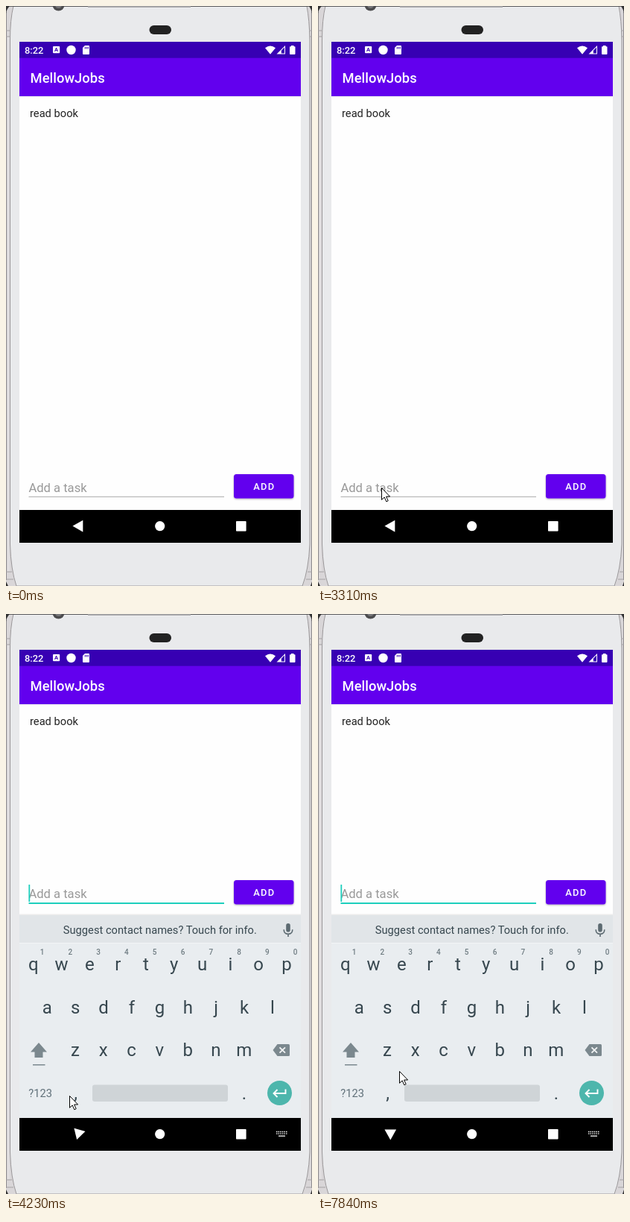
An HTML page that plays this animation: 411x778 px, repeating every 8 s.

```html
<!DOCTYPE html>
<html lang="en">
<head>
<meta charset="utf-8">
<title>To-do list</title>
<style>
  html, body { margin: 0; width: 100%; height: 100%; overflow: hidden; background: #e9eaec; }
  svg { display: block; width: 100vw; height: 100vh; font-family: Roboto, sans-serif; }
  .mid { text-anchor: middle; }
  .medium { font-weight: 500; }
</style>
</head>
<body>
<svg viewBox="0 0 411 778">
  <defs>
    <clipPath id="screen"><rect x="18" y="48" width="378" height="672"/></clipPath>
    <filter id="shadow" x="-10%" y="-20%" width="120%" height="150%">
      <feDropShadow dx="0" dy="1" stdDeviation=".9" flood-opacity=".32"/>
    </filter>
    <filter id="glow"><feDropShadow dx="0" dy="0" stdDeviation=".6" flood-opacity=".2"/></filter>
  </defs>

  <!-- phone body -->
  <rect width="411" height="778" fill="#d9d6d8"/>
  <path d="M10 0Q5.5 18 5.5 46V722Q6.5 756 14 778H398Q406.5 756 408 722V46Q407.5 18 404 0Z"
        fill="#e9eaec" stroke="#9a9799"/>
  <path d="M.5 8V770M410.5 8V770" stroke="#8e8b8d"/>
  <path d="M3.5 42V758" stroke="#e4e1e3" stroke-width="2"/>
  <path d="M0 33H6M0 41H6M408 33H411M408 41H411M0 759H8M0 769H10M405 759H411M403 769H411" stroke="#a5a2a4"/>
  <path d="M0 0H411" stroke="#3b3b3b" stroke-width="1.6"/>
  <path d="M110 1H248" stroke="#a4a4a6" stroke-width="2"/>
  <path d="M0 0H5Q1 4 0 10ZM411 0H407Q410 4 411 10ZM0 772L3 778H0ZM411 772L409 778H411Z" fill="#333"/>
  <circle cx="70.5" cy="-1.5" r="8" fill="#4c4c4e"/>
  <circle cx="70.5" cy="-1.5" r="4.5" fill="#77777a"/>
  <rect x="192.5" y="26" width="29.5" height="12" rx="6" fill="#222"/>

  <g clip-path="url(#screen)">
    <rect x="18" y="48" width="378" height="672" fill="#fefefe"/>
    <rect x="18" y="69" width="378" height="52" fill="#6200ee"/>
    <rect x="18" y="48" width="378" height="21.7" fill="#3700b3"/>
    <rect x="18" y="121" width="378" height="1" fill="#000" opacity=".06"/>

    <!-- status bar -->
    <g fill="#fff">
      <text class="medium" x="25" y="63.6" font-size="12.9">8:22</text>
      <rect x="63" y="54" width="9.2" height="9.2" rx="1"/>
      <text class="mid" x="67.6" y="61.4" font-size="7.5" font-weight="700" fill="#3700b3">A</text>
      <circle cx="87.5" cy="59" r="6.2"/>
      <path d="M106 53H111Q112 53 112 54V64Q112 65 111 65H104Q103 65 103 64V56Z"/>
      <path d="M106.3 55V57.5M108.3 55V57.5M110.3 55V57.5" stroke="#3700b3"/>
      <path d="M348 56.3Q355 50.7 362 56.3L355 64.7Z"/>
      <path d="M375 53V64.5H363.5ZM374 55.6L369.8 59.8V63.5H374Z" fill-rule="evenodd"/>
      <path d="M383 53H386.5V54.2H387.6Q388.5 54.2 388.5 55V64Q388.5 65 387.6 65H382Q381 65 381 64V55Q381 54.2 382 54.2H383Z"/>
    </g>

    <text class="medium" x="32.6" y="102.6" font-size="18.4" fill="#fff">MellowJobs</text>
    <text x="32" y="149" font-size="14.7" fill="#222">read book</text>

    <g id="form">
      <text x="30.4" y="652" font-size="16.6" fill="#999">Add a task</text>
      <rect id="line" x="30.5" width="262.5"/>
      <rect id="caret" x="30.4" y="634" width="1.8" height="23" fill="#1dcfbd"/>
      <rect x="306" y="628" width="80.5" height="32.5" rx="3.5" fill="#6200ee" filter="url(#shadow)"/>
      <text class="mid medium" x="346.8" y="649" font-size="12.9" letter-spacing="1.15" fill="#fff">ADD</text>
    </g>

    <g id="keyboard">
      <rect x="18" y="402.5" width="378" height="1.5" opacity=".07"/>
      <rect x="18" y="404" width="378" height="330" fill="#e9edf0"/>
      <rect x="18" y="404" width="378" height="37" fill="#e1e5e8"/>
      <rect x="18" y="441" width="378" height="1" fill="#f3f5f6"/>
      <text class="mid" x="206.8" y="429" font-size="14.7" fill="#37474f">Suggest contact names? Touch for info.</text>
      <rect x="376.2" y="415" width="5.6" height="11.5" rx="2.8" fill="#5c6a71"/>
      <path d="M373.2 423.2Q373.2 429.2 379 429.2T384.8 423.2M379 429V433" fill="none" stroke="#5c6a71" stroke-width="1.6"/>
      <g id="keys"></g>
      <path d="M44 575L33 587.5H38.5V595H49.5V587.5H55ZM36 604H52.5V605.6H36Z" fill="#7b888e"/>
      <path d="M364.5 577H379.5Q381 577 381 578.5V591.5Q381 593 379.5 593H364.5L358.5 585Z" fill="#7b888e"/>
      <path d="M367.5 581.3L375 588.7M375 581.3L367.5 588.7" stroke="#f2f4f5" stroke-width="1.8"/>
      <text x="30.3" y="647.8" font-size="14.7" fill="#607079">?123</text>
      <rect x="116" y="631.5" width="182" height="22.5" rx="3" fill="#cfd4d7"/>
      <circle cx="367.5" cy="642.5" r="16.5" fill="#4db6ac"/>
      <path d="M375.5 637.5V643H360M364.5 638L359.5 643L364.5 648" fill="none" stroke="#fff" stroke-width="1.9"/>
    </g>

    <!-- navigation bar -->
    <rect id="nav" x="18" y="676" width="378" height="44"/>
    <g fill="#fff" filter="url(#glow)">
      <path id="back" d="M-7.8 0L6 -7.8V7.8Z"/>
      <circle cx="206.7" cy="697.6" r="6.6"/>
      <rect x="309" y="691" width="13.6" height="13.6" rx=".8"/>
    </g>
    <g id="switcher" fill="none" stroke="#fff" stroke-width="1.3">
      <path d="M363 694.5H378M363 697.2H378" stroke-dasharray="1.5 1.1"/>
      <path d="M366 700.2H375"/>
    </g>
  </g>

  <path id="pointer" d="M.5 .5V16.3L4.2 12.9L6.8 18.8L9.2 17.7L6.6 12H11.6Z" fill="#fff" stroke="#000"/>
</svg>
<script>
const LOOP = 8000, FOCUS = 3710, ACTIVE = 3990, SLIDE = 4110, OPEN = 4230, SETTLED = 4380;
const BLINKS = [ACTIVE, SETTLED, 4970, 5370, 5870, 6450, 6880, 7310, 7840];
// [time, x, y]; no position hides the pointer
const POINTER = [
  [0], [500, 398, 435], [620, 330, 560], [740, 215, 655], [860, 130, 700], [1010],
  [2010, 248, 766], [2130, 215, 728], [2250, 175, 694], [2400, 107, 656], [2550, 100, 635],
  [2800, 99, 635], [2950, 95, 638], [3070, 91, 641], [3190, 88, 644], [3310, 85, 646],
  [6020, 98, 629], [6140, 109, 613]
];
const $ = id => document.getElementById(id);
const show = (id, on) => $(id).setAttribute('visibility', on ? 'visible' : 'hidden');
const move = (id, x, y, turn = 0) =>
  $(id).setAttribute('transform', `translate(${x} ${y}) rotate(${turn})`);

const row = (chars, x, y, size, color, extra = '') => [...chars].map((c, i) =>
  `<text class="mid ${extra}" x="${x + i * 37.8}" y="${y}" font-size="${size}" fill="${color}">${c}</text>`).join('');
$('keys').innerHTML =
  row('qwertyuiop', 36.8, 478, 24, '#37474f') +
  row('1234567890', 48.5, 457, 10, '#707d83', 'medium') +
  row('asdfghjkl', 55.4, 536, 24, '#37474f') +
  row('zxcvbnm', 93, 593, 24, '#37474f') +
  row(',', 93.5, 651, 24, '#37474f') +
  row('.', 320, 651, 24, '#37474f');

function draw(t) {
  const focused = t >= FOCUS, sliding = t >= SLIDE && t < OPEN;
  const line = $('line');
  line.setAttribute('y', focused ? 658 : 657.8);
  line.setAttribute('height', focused ? 2 : 1);
  line.setAttribute('fill', focused ? '#1dcfbd' : '#a8a8a8');
  show('caret', BLINKS.filter(b => b <= t).length % 2);

  move('form', 0, t < SLIDE ? 0 : -271);
  show('keyboard', t >= ACTIVE);
  move('keyboard', 0, t < SLIDE ? 272 : sliding ? 51 : 0);
  show('nav', !sliding);
  show('switcher', t >= ACTIVE);
  move('back', 97.3, 697.6, t < SLIDE ? 0 : sliding ? -8 : t < SETTLED ? -74 : -90);

  const [, x, y] = POINTER.findLast(p => p[0] <= t);
  show('pointer', x !== undefined);
  if (x !== undefined) move('pointer', x, y);
}

let start;
function tick(now) {
  start ??= now;
  draw((now - start) % LOOP);
  requestAnimationFrame(tick);
}
draw(0);
requestAnimationFrame(tick);
</script>
</body>
</html>
```
